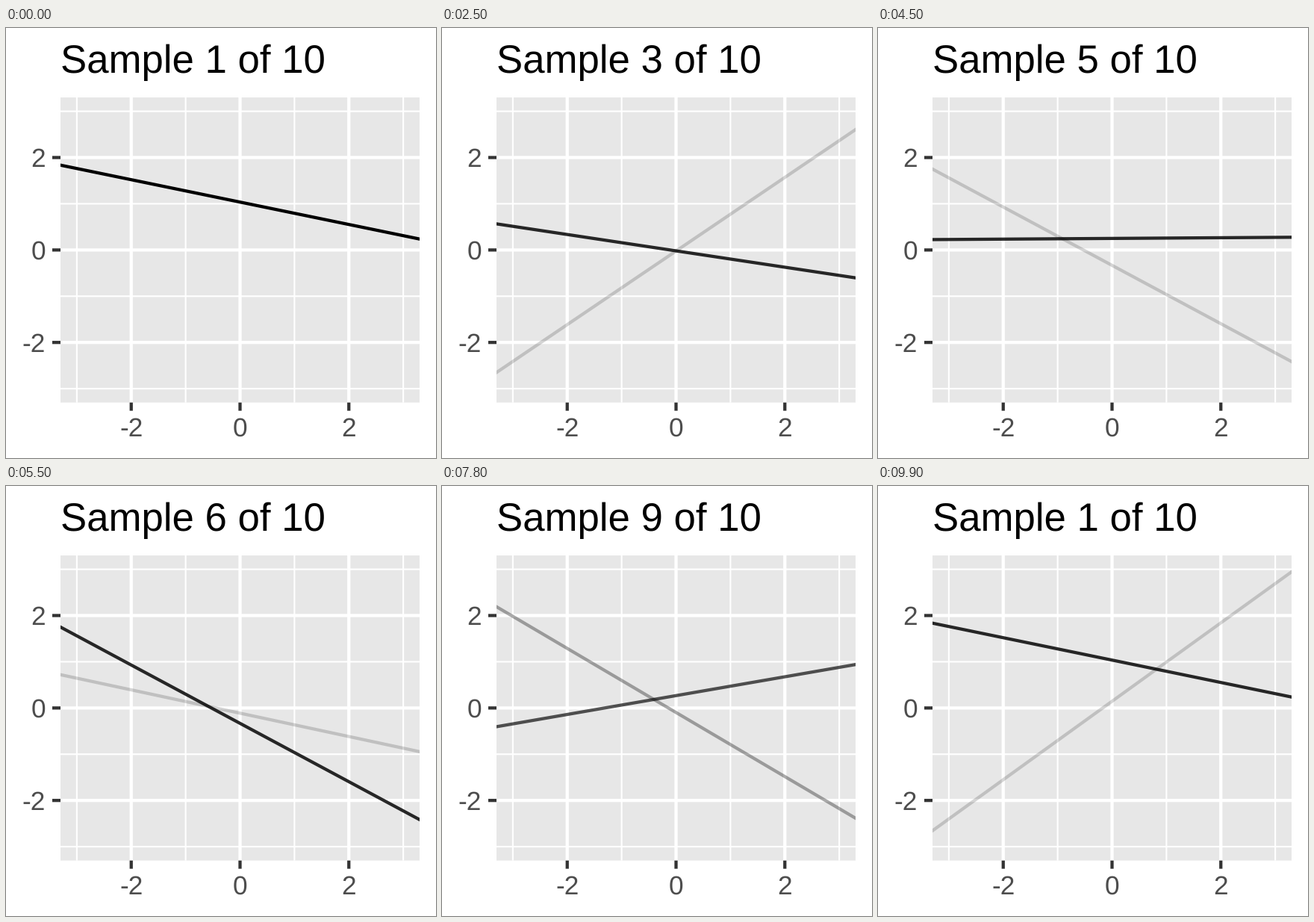
Write a matplotlib script that moves like this. It is 576 px wide and 576 px high and loops after 10 s.

```python
import matplotlib
import matplotlib.pyplot as plt
from matplotlib.animation import FuncAnimation
from matplotlib.patches import Rectangle

matplotlib.rcParams["font.family"] = "Liberation Sans"
matplotlib.rcParams["text.hinting"] = "none"

SIZE, DPI = 576, 100
LEFT, RIGHT, TOP, BOTTOM = 73.0, 554.0, 93.0, 501.7
LIMIT = 3.3
LINE = 4.27
TICK = 11
PER_STATE = 10

# Height of each regression line at the left and right panel edge
SAMPLES = [
    (1.835, 0.237), (1.46, 1.85), (0.565, -0.603), (-2.65, 2.605),
    (0.225, 0.275), (1.75, -2.415), (0.72, -0.945), (2.19, -2.385),
    (-0.405, 0.94), (-2.655, 2.945),
]


def px(n):
    return n * 72 / DPI


def to_x(v):
    return LEFT + (v + LIMIT) / (2 * LIMIT) * (RIGHT - LEFT)


def to_y(v):
    return BOTTOM - (v + LIMIT) / (2 * LIMIT) * (BOTTOM - TOP)


fig = plt.figure(figsize=(SIZE / DPI, SIZE / DPI), dpi=DPI, facecolor="white")
ax = fig.add_axes([0, 0, 1, 1])
ax.set_xlim(0, SIZE)
ax.set_ylim(SIZE, 0)
ax.axis("off")

panel = Rectangle((LEFT, TOP), RIGHT - LEFT, BOTTOM - TOP,
                  facecolor="#e7e7e7", linewidth=0, zorder=0, snap=False)
ax.add_patch(panel)


def stroke(xs, ys, color, width, zorder):
    line, = ax.plot(xs, ys, color=color, linewidth=px(width), zorder=zorder,
                    solid_capstyle="butt", snap=False)
    return line


def grid(values, width, zorder):
    for v in values:
        stroke([to_x(v)] * 2, [TOP, BOTTOM], "white", width, zorder)
        stroke([LEFT, RIGHT], [to_y(v)] * 2, "white", width, zorder)


grid((-3, -1, 1, 3), LINE / 2, 1)
grid((-2, 0, 2), LINE, 2)

label = dict(fontsize=px(35.2), color="#4d4d4d", va="baseline")
for v in (-2, 0, 2):
    x, y = to_x(v), to_y(v)
    stroke([x, x], [BOTTOM, BOTTOM + TICK], "#333333", LINE, 3)
    stroke([LEFT - TICK, LEFT], [y, y], "#333333", LINE, 3)
    ax.text(x, 546.7, str(v), ha="center", **label)
    ax.text(LEFT - TICK - 8.8, y + 12.6, str(v), ha="right", **label)

title = ax.text(LEFT, 59.8, "", fontsize=px(52.8), color="black",
                ha="left", va="baseline")


def sample_line(a, b):
    # Run past both edges so the panel clips the ends
    extra = (b - a) * 0.02
    reach = (RIGHT - LEFT) * 0.02
    line = stroke([LEFT - reach, RIGHT + reach],
                  [to_y(a - extra), to_y(b + extra)], "black", LINE, 4)
    line.set_clip_path(panel)
    return line


lines = [sample_line(a, b) for a, b in SAMPLES]


def update(frame):
    state, pos = divmod(frame, PER_STATE)
    following = (state + 1) % len(lines)
    hold = 3 if state == 0 else 4
    mix = max(0, pos - hold) / (PER_STATE - hold)
    for line in lines:
        line.set_alpha(0)
    lines[state].set_alpha(1 - mix)
    lines[following].set_alpha(mix)
    closest = following if mix > 0.5 else state
    title.set_text(f"Sample {closest + 1} of {len(lines)}")
    return lines + [title]


anim = FuncAnimation(fig, update, frames=PER_STATE * len(lines), interval=100,
                     repeat=True, repeat_delay=0)
plt.show()
```
